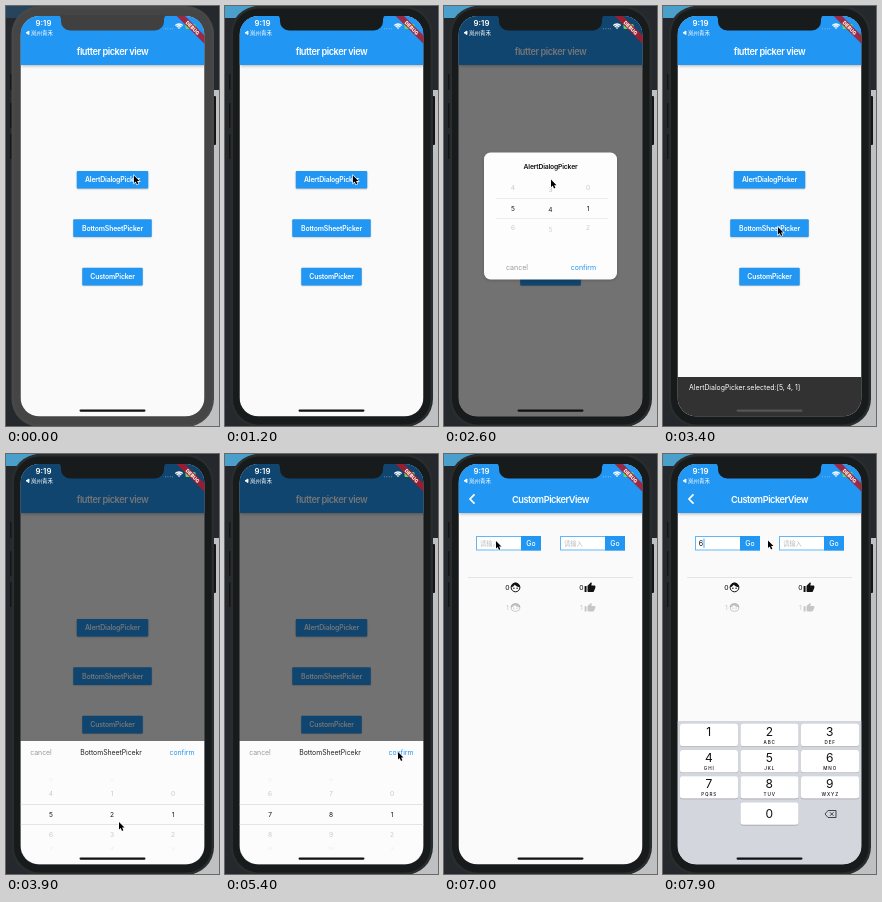
These frames come from a looping animation (213 px wide and 420 px high, 8 s). An HTML page with a canvas:

```html
<!DOCTYPE html>
<html lang="en">
<head>
<meta charset="utf-8">
<title>Picker demo</title>
<style>
  html, body { margin: 0; width: 213px; height: 420px; overflow: hidden; }
  canvas { display: block; width: 213px; height: 420px; }
</style>
</head>
<body>
<canvas id="stage"></canvas>
<script>
const LOOP = 8000;
const BLUE = '#2196f3';
const canvas = document.getElementById('stage');
const ctx = canvas.getContext('2d');
const dpr = window.devicePixelRatio || 1;
canvas.width = 213 * dpr;
canvas.height = 420 * dpr;

// Screen rectangle inside the phone
const L = 14.5, T = 10, W = 184, H = 400.5, MID = L + W / 2, BOTTOM = T + H;

const clamp = v => Math.max(0, Math.min(1, v));
const span = (t, a, b) => clamp((t - a) / (b - a));
const easeOut = p => 1 - (1 - p) ** 3;
const easeInOut = p => p * p * (3 - 2 * p);
const out = (t, a, b) => easeOut(span(t, a, b));
const smooth = (t, a, b) => easeInOut(span(t, a, b));

function rect(x, y, w, h, fill, r = 0) {
  ctx.fillStyle = fill;
  ctx.beginPath();
  ctx.roundRect(x, y, w, h, r);
  ctx.fill();
}

function path(points, stroke, width = 1) {
  ctx.beginPath();
  points.forEach(([x, y]) => ctx.lineTo(x, y));
  ctx.strokeStyle = stroke;
  ctx.lineWidth = width;
  ctx.stroke();
}

function ring(x, y, r, stroke, width, from = 0, to = Math.PI * 2) {
  ctx.beginPath();
  ctx.arc(x, y, r, from, to);
  ctx.strokeStyle = stroke;
  ctx.lineWidth = width;
  ctx.stroke();
}

function dot(x, y, r, fill) {
  ctx.beginPath();
  ctx.arc(x, y, r, 0, Math.PI * 2);
  ctx.fillStyle = fill;
  ctx.fill();
}

// Text centred vertically on y
function text(str, x, y, size, fill, { weight = 400, align = 'center', spacing = 0 } = {}) {
  ctx.font = `${weight} ${size}px Inter, "Noto Sans CJK SC", sans-serif`;
  ctx.letterSpacing = spacing + 'px';
  ctx.textAlign = align;
  ctx.fillStyle = fill;
  ctx.fillText(str, x, y + size * 0.36);
}

function layer(alpha, draw, dx = 0, dy = 0) {
  if (alpha <= 0) return;
  ctx.save();
  ctx.globalAlpha *= alpha;
  ctx.translate(dx, dy);
  draw();
  ctx.restore();
}

function withShadow(color, blur, dy, draw) {
  ctx.save();
  ctx.shadowColor = color;
  ctx.shadowBlur = blur * dpr;
  ctx.shadowOffsetY = dy * dpr;
  draw();
  ctx.restore();
}

function appBar(title) {
  rect(L, T, W, H, '#fafafa');
  withShadow('rgba(0,0,0,.3)', 3, 1, () => rect(L, T, W, 49, BLUE));
  text(title, MID, 45.3, 9.2, '#fff', { weight: 600, spacing: -0.45 });
}

function button(label, y, w) {
  withShadow('rgba(0,0,0,.25)', 1.5, 0.7, () => rect(MID - w / 2, y, w, 17.6, BLUE, 1));
  text(label, MID, y + 9, 6.9, '#fff', { weight: 600, spacing: -0.18 });
}

function snackBar(message, p) {
  if (p <= 0) return;
  const y = BOTTOM - 39.5 * p;
  rect(L, y, W, 41, '#323232');
  text(message, 26, y + 11, 6.9, '#fff', { align: 'left' });
}

function homePage(t) {
  appBar('flutter picker view');
  button('AlertDialogPicker', 165, 71.5);
  button('BottomSheetPicker', 213.3, 78.5);
  button('CustomPicker', 261.8, 60.5);
  if (t < 5800) snackBar('AlertDialogPicker.selected:[5, 4, 1]', out(t, 3050, 3300));
  else snackBar('BottomSheetPicker.selected:[7, 8, 1]', out(t, 5850, 6100));
}

// Calls draw(value, y, squeeze) for the rows of a cylinder around the selected value
function wheel(value, y, reach, draw) {
  for (let i = Math.max(0, Math.ceil(value - reach)); i <= value + reach; i++) {
    const angle = (i - value) * 0.54;
    const away = Math.abs(i - value);
    layer(0.22 + 0.78 * clamp(1 - away) - 0.15 * Math.max(0, away - 1),
      () => draw(i, y + 39 * Math.sin(angle), Math.cos(angle)));
  }
}

function numberWheels(values, xs, y, reach) {
  values.forEach((value, k) => wheel(value, y, reach, (n, ny, squeeze) => {
    ctx.translate(xs[k], ny);
    ctx.scale(1, squeeze);
    text(n, 0, 0, 6.6, '#111');
  }));
}

function dividers(x1, x2, ...ys) {
  for (const y of ys) rect(x1, y, x2 - x1, 0.6, '#dcdcdc');
}

function dialog(t) {
  withShadow('rgba(0,0,0,.2)', 3, 1, () => rect(40, 146.5, 133, 127, '#fdfdfd', 6.5));
  text('AlertDialogPicker', MID, 160.5, 6.8, '#111', { weight: 600, spacing: -0.2 });
  numberWheels([5, 2 + 2 * smooth(t, 2250, 2650), 1], [69, 106.5, 144], 202.3, 1.4);
  dividers(52, 164, 192, 212);
  text('cancel', 73, 261.5, 7, '#999');
  text('confirm', 139.5, 261.5, 7, BLUE);
}

function sheet(t) {
  rect(L, 287, W, BOTTOM - 287, '#fcfcfc');
  text('cancel', 35, 299, 6.9, '#999');
  text('BottomSheetPicekr', 105, 299, 6.9, '#222', { spacing: -0.05 });
  text('confirm', 176, 299, 6.9, BLUE);
  const first = 5 + 2 * smooth(t, 4850, 5150);
  const second = 2 + 3 * smooth(t, 4050, 4350) + 3 * smooth(t, 4450, 4750);
  numberWheels([first, second, 1], [45, 106, 167], 360.5, 2.1);
  dividers(L, L + W, 350.3, 370.3);
}

function inputRow(x) {
  rect(x, 82, 45, 15, '#fff');
  ctx.strokeStyle = '#63b5f6';
  ctx.lineWidth = 1;
  ctx.strokeRect(x + 0.5, 82.5, 64, 13.5);
  rect(x + 45, 82, 20, 14.5, BLUE);
  text('Go', x + 55, 89.4, 6.9, '#fff', { weight: 500 });
}

function faceIcon(x, y) {
  ring(x, y, 4.4, '#111', 1);
  ctx.beginPath();
  ctx.arc(x, y, 4.6, Math.PI, 0);
  ctx.quadraticCurveTo(x + 1, y - 0.4, x - 0.8, y - 2.6);
  ctx.quadraticCurveTo(x - 2, y - 0.6, x - 4.6, y);
  ctx.fillStyle = '#111';
  ctx.fill();
  dot(x - 1.6, y + 0.9, 0.7, '#111');
  dot(x + 1.6, y + 0.9, 0.7, '#111');
}

const thumb = new Path2D('M1 21h4V9H1zM23 10c0-1.1-.9-2-2-2h-6.3l1-4.9c0-.4-.2-.8-.5-1L14.2 1 7.6 7.6C7.2 8 7 8.5 7 9v10c0 1.1.9 2 2 2h9c.8 0 1.5-.5 1.8-1.2l3-7c.1-.3.2-.5.2-.8z');

function thumbIcon(x, y) {
  ctx.save();
  ctx.translate(x - 5.9, y - 5.7);
  ctx.scale(0.49, 0.49);
  ctx.fillStyle = '#111';
  ctx.fill(thumb);
  ctx.restore();
}

function customPage(t) {
  appBar('CustomPickerView');
  path([[30.5, 40.3], [26, 45], [30.5, 49.7]], '#fff', 1.7);
  inputRow(32);
  inputRow(116);
  const focused = t > 7150, typed = t >= 7700;
  if (typed) text('6', 35.7, 89.4, 7.2, '#111', { align: 'left' });
  else if (!focused) text('请输入', 36, 89.4, 6.3, '#bbb', { align: 'left' });
  if (focused) rect(typed ? 40.6 : 36, 84.5, 0.8, 9.5, BLUE);
  text('请输入', 120, 89.4, 6.3, '#bbb', { align: 'left' });
  dividers(24, 189, 123.3);
  [[63.5, 71.5, faceIcon], [137.5, 146, thumbIcon]].forEach(([x, iconX, icon]) =>
    wheel(0, 133.4, 1.4, (n, y, squeeze) => {
      ctx.translate(0, y);
      ctx.scale(1, squeeze);
      text(n, x, 0, 6.8, '#111');
      icon(iconX, 0);
    }));
}

const letters = ['', 'ABC', 'DEF', 'GHI', 'JKL', 'MNO', 'PQRS', 'TUV', 'WXYZ'];

function key(digit, label, col, row, pressed) {
  const x = 17 + col * 60.5, y = 269.8 + row * 26.2;
  rect(x, y + 0.6, 58, 22.4, '#9a9da3', 2.5);
  rect(x, y, 58, 22.4, pressed ? '#bcc0c7' : '#fff', 2.5);
  text(digit, x + 28.8, y + (row === 3 ? 11 : 7.8), 12, '#111');
  if (label) text(label, x + 29.2, y + 18.3, 4.6, '#111', { weight: 500, spacing: 0.9 });
}

function keyboard(t) {
  rect(L, 267, W, BOTTOM - 267, '#d3d6dc');
  letters.forEach((label, i) =>
    key(i + 1, label, i % 3, Math.floor(i / 3), i === 5 && t >= 7600 && t < 7700));
  key(0, '', 1, 3);
  path([[162, 360], [165, 356.5], [173, 356.5], [173, 363.5], [165, 363.5], [162, 360]], '#222', 0.8);
  path([[167, 358.3], [170.5, 361.8]], '#222', 0.8);
  path([[170.5, 358.3], [167, 361.8]], '#222', 0.8);
}

function statusBar() {
  text('9:19', 37.5, 17.5, 7.8, '#fff', { weight: 600 });
  path([[20, 26.8], [23, 25], [23, 28.6], [20, 26.8]], '#fff', 0.8);
  ctx.fill();
  text('岚州青禾', 25, 26.8, 5.5, '#fff', { align: 'left' });
  for (let i = 0; i < 4; i++) dot(159.5 + i * 2.4, 22.8, 0.5, 'rgba(255,255,255,.5)');
  for (const r of [1.2, 3.2, 5.2]) ring(173, 23.2, r, '#fff', 1.3, -Math.PI * 0.75, -Math.PI * 0.25);
  rect(179.5, 18, 10, 5, '#62d66b', 1.3);
}

function debugBanner() {
  ctx.save();
  ctx.translate(L + W, T);
  ctx.rotate(Math.PI / 4);
  rect(-20, 13.8, 40, 5.9, 'rgba(176,24,38,.85)');
  text('DEBUG', 0, 16.8, 5, '#fff', { weight: 800 });
  ctx.restore();
}

function desktop(active) {
  rect(0, 0, 213, 420, '#25282d');
  rect(0, 0, 30, 12, active ? '#4a9fcb' : '#28435c');
  rect(180, 84, 33, 336, '#bfc0c1');
}

function phone(active) {
  rect(207, 90, 3, 49, '#151515', 1);
  for (const [y, h] of [[68, 16], [97, 25], [128, 25]]) rect(4, y, 3, h, '#151515', 1);
  rect(5.5, 0, 202.5, 421, active ? '#2a2d2d' : '#484848', 28);
  rect(8, 2.5, 197.5, 416, active ? '#181b1b' : '#454545', 25.5);
}

function notch(active) {
  ctx.fillStyle = active ? '#181b1b' : '#404040';
  ctx.beginPath();
  ctx.moveTo(52, T - 1);
  ctx.quadraticCurveTo(55, T, 55, T + 4);
  ctx.arcTo(55, 24.5, 64, 24.5, 9);
  ctx.arcTo(158, 24.5, 158, T + 4, 9);
  ctx.lineTo(158, T + 4);
  ctx.quadraticCurveTo(158, T, 161, T - 1);
  ctx.fill();
}

// Pointer stops: time, x, y
const stops = [
  [0, 128, 169.5], [1200, 128, 169.5], [1700, 117, 166], [1950, 117, 166],
  [2250, 107, 208], [2650, 107, 172], [2880, 140, 259], [3000, 140, 259],
  [3380, 115, 221], [3600, 115, 221], [3850, 113, 368], [4050, 113, 368],
  [4300, 111, 342], [4450, 111, 370], [4700, 111, 340], [4850, 47, 368],
  [5120, 47, 346], [5380, 173, 298], [5650, 173, 298], [6250, 120, 269],
  [6500, 120, 269], [7000, 52, 87], [7200, 52, 87], [7550, 75, 93],
  [7850, 105, 86.5], [8000, 105, 86.5]
];
const presses = [[1750, 1950], [2900, 3000], [3480, 3600], [5480, 5600], [6380, 6500], [7050, 7180]];
const arrow = new Path2D('M0 0V7.6L1.7 6L3 8.900L4.400 8.300L3.100 5.600H5.500Z');

function pointer(t) {
  const i = stops.findIndex(s => s[0] > t);
  const [t0, x0, y0] = stops[i - 1], [t1, x1, y1] = stops[i];
  const p = smooth(t, t0, t1);
  const x = x0 + (x1 - x0) * p, y = y0 + (y1 - y0) * p;
  if (presses.some(([a, b]) => t >= a && t < b)) ring(x, y, 13, '#222', 1.2);
  ctx.save();
  ctx.translate(x, y);
  ctx.strokeStyle = '#fff';
  ctx.lineWidth = 1.2;
  ctx.stroke(arrow);
  ctx.fillStyle = '#000';
  ctx.fill(arrow);
  ctx.restore();
}

function screen(t) {
  const push = out(t, 6480, 6880);
  if (push < 1) layer(1, () => homePage(t), -W / 3 * push);
  if (push > 0) layer(1, () => customPage(t), W * (1 - push));

  const dialogShown = span(t, 1790, 1970) * (1 - span(t, 2950, 3130));
  const sheetShown = out(t, 3580, 3850) * (1 - smooth(t, 5520, 5720));
  const barrier = 0.54 * Math.max(dialogShown, sheetShown);
  if (barrier) rect(L, T, W, H, `rgba(0,0,0,${barrier})`);
  layer(clamp(dialogShown * 1.7), () => dialog(t));
  if (sheetShown) layer(1, () => sheet(t), 0, 124 * (1 - sheetShown));

  const keys = out(t, 7200, 7480);
  if (keys) layer(1, () => keyboard(t), 0, 144 * (1 - keys));

  statusBar();
  debugBanner();
  const overSnack = (t > 3100 && t < 3650) || (t > 5650 && t < 6600);
  rect(73.5, 403.5, 66, 2.2, overSnack ? '#555' : '#111', 1.1);
}

function render(t) {
  const active = t >= 1000;
  ctx.setTransform(dpr, 0, 0, dpr, 0, 0);
  desktop(active);
  phone(active);
  ctx.save();
  ctx.beginPath();
  ctx.roundRect(L, T, W, H, 19);
  ctx.clip();
  screen(t);
  ctx.restore();
  notch(active);
  pointer(t);
}

let start;
function tick(now) {
  start ??= now;
  render((now - start) % LOOP);
  requestAnimationFrame(tick);
}
requestAnimationFrame(tick);
</script>
</body>
</html>
```
